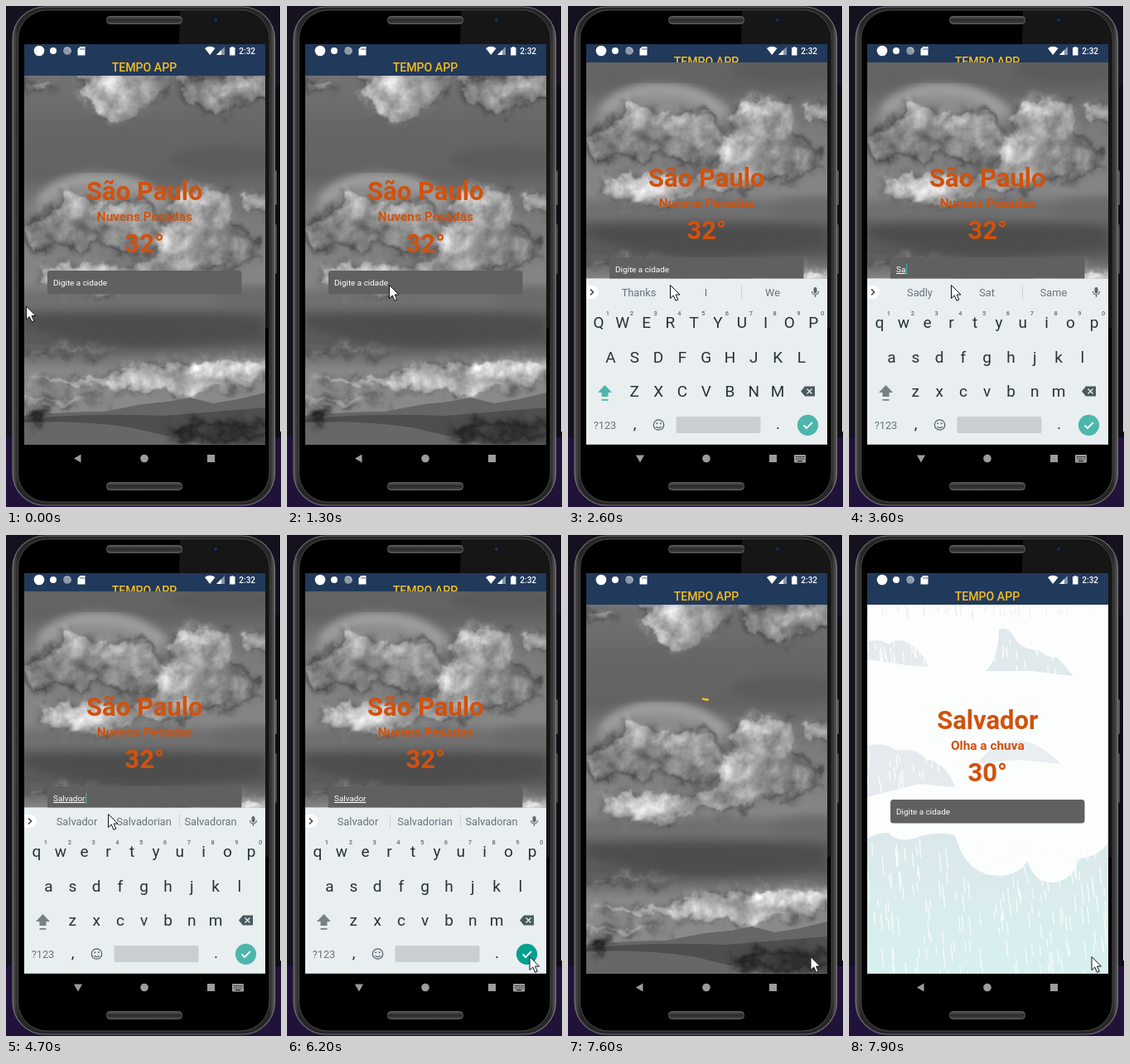
An HTML page that plays this animation: 332x604 px, repeating every 8000 ms.

```html
<!DOCTYPE html>
<html lang="pt">
<head>
<meta charset="utf-8">
<title>Tempo App</title>
<style>
html, body { margin: 0; width: 100%; height: 100%; overflow: hidden; background: #15111f; }
svg { display: block; width: 100vw; height: 100vh; }
text { font-family: Roboto, sans-serif; white-space: pre; }
.mid { text-anchor: middle; }
.key { font-size: 19px; fill: #263238; }
.num { font-size: 7.5px; font-weight: 500; fill: #5b6a72; }
.tip { font-size: 12.75px; fill: #66737a; }
.big { font-size: 31px; font-weight: 700; }
.sub { font-size: 15.4px; font-weight: 700; }
</style>
</head>
<body>
<svg id="stage" viewBox="0 0 332 604" xmlns="http://www.w3.org/2000/svg"></svg>
<script>
const LOOP = 8000, STEP = 100;
const stage = document.getElementById('stage');

// Small markup helpers
const rect = (x, y, w, h, fill, more = '') =>
  `<rect x="${x}" y="${y}" width="${w}" height="${h}" fill="${fill}" ${more}/>`;
const dot = (x, y, r, fill, more = '') => `<circle cx="${x}" cy="${y}" r="${r}" fill="${fill}" ${more}/>`;
const path = (d, fill, more = '') => `<path d="${d}" fill="${fill}" ${more}/>`;
const line = (d, stroke, w, more = '') => path(d, 'none', `stroke="${stroke}" stroke-width="${w}" ${more}`);
const text = (x, y, s, cls, more = '') => `<text x="${x}" y="${y}" class="${cls}" ${more}>${s}</text>`;
const oval = (x, y, rx, ry, fill) => `<ellipse cx="${x}" cy="${y}" rx="${rx}" ry="${ry}" fill="${fill}"/>`;

function random(seed) {
  return () => (seed = (seed * 16807) % 2147483647) / 2147483647;
}

const defs = `<defs>
  <linearGradient id="rim"><stop offset="0" stop-color="#555"/><stop offset=".02" stop-color="#262626"/>
    <stop offset=".98" stop-color="#262626"/><stop offset="1" stop-color="#5c5c5c"/></linearGradient>
  <linearGradient id="grille" x2="0" y2="1"><stop offset="0" stop-color="#555"/><stop offset=".5" stop-color="#292929"/>
    <stop offset="1" stop-color="#4a4a4a"/></linearGradient>
  <linearGradient id="sky" x2="0" y2="1"><stop offset="0" stop-color="#757575"/><stop offset=".14" stop-color="#666"/>
    <stop offset=".27" stop-color="#636363"/><stop offset=".36" stop-color="#7a7a7a"/><stop offset=".56" stop-color="#868686"/>
    <stop offset=".64" stop-color="#626262"/><stop offset=".72" stop-color="#5a5a5a"/><stop offset=".8" stop-color="#888"/>
    <stop offset=".87" stop-color="#8a8a8a"/></linearGradient>
  <linearGradient id="rainSky" x2="0" y2="1"><stop offset="0" stop-color="#dbe8eb"/><stop offset="1" stop-color="#d8f0f0"/></linearGradient>
  <filter id="puff" x="-20%" y="-20%" width="140%" height="140%" color-interpolation-filters="sRGB">
    <feTurbulence type="fractalNoise" baseFrequency=".05" numOctaves="4" seed="4" result="noise"/>
    <feColorMatrix in="noise" values="1 0 0 0 0 1 0 0 0 0 1 0 0 0 0 0 0 0 0 1" result="grain"/>
    <feGaussianBlur in="SourceGraphic" stdDeviation="4"/>
    <feDisplacementMap in2="noise" scale="24" xChannelSelector="R" yChannelSelector="G"/>
    <feComposite in2="grain" operator="arithmetic" k1=".8" k2=".6"/></filter>
  <filter id="soft" x="-20%" y="-20%" width="140%" height="140%"><feGaussianBlur stdDeviation="6"/></filter>
  <clipPath id="screen"><rect x="22" y="46" width="291" height="482.5"/></clipPath>
  <clipPath id="view"><rect id="viewBox" x="22" y="84" width="291" height="445"/></clipPath>
</defs>`;

const phone = () =>
  rect(0, 0, 332, 604, '#15111f') + rect(0, 520, 332, 84, '#21123a') +
  rect(324, 96, 8, 424, '#0e0c15') + rect(331, 0, 1, 513, '#f4f4f4') +
  rect(323, 198, 4, 42, '#555', 'rx="1.5"') + rect(323, 263, 4, 60, '#444', 'rx="1.5"') +
  rect(8, 1, 316.5, 601, 'url(#rim)', 'rx="39" stroke="#727272" stroke-width="1.2"') +
  rect(14.5, 5, 303.5, 593, '#000', 'rx="35" stroke="#4a4a4a" stroke-width="1"') +
  path('M210 6H283Q316 9 317.500 43V388H313V46H209Z', '#161616') +
  [12.5, 574.5].map(y => rect(121.5, y, 91, 9, 'url(#grille)', 'rx="4" stroke="#6a6a6a" stroke-width=".8"')).join('') +
  dot(253, 17, 4.5, '#11141f') + dot(253, 17, 2.2, '#1d2c4c');

const status = () =>
  dot(40, 54, 6.3, '#fff') + dot(57, 54, 4, '#fff') +
  dot(74, 54, 4.8, '#8f9aa8') + line('M70.5 51A4.8 4.8 0 0 1 78 56', '#b9c1cb', 1) +
  path('M89.500 49H95.500V59.500H86.500V52Z', '#fff') + line('M90 51V53M92 51V53M94 51V53', '#21395b', .8) +
  path('M240 51Q246 46.500 252.500 51L246.200 59Z', '#fff') +
  path('M264 49V59H254Z', '#8797aa') + path('M260 53V59H254Z', '#fff') +
  path('M270 50H272V49H274.500V50H276.500V59.500H270Z', '#fff') +
  text(281.3, 58, '2:32', '', 'font-size="10" font-weight="500" fill="#fff"');

// Clouds over fields, in soft grey tones
const photo = () => rect(22, 84, 291, 445, 'url(#sky)') +
  `<g filter="url(#soft)">${
    oval(265, 185, 70, 16, '#5c5c5c') + oval(150, 356, 190, 12, '#6f6f6f') +
    path('M22 372Q160 362 313 374V400Q210 412 160 412Q90 408 22 388Z', '#4d4d4d') +
    oval(300, 352, 55, 14, '#6b6b6b')
  }</g><g filter="url(#puff)">${
    path('M78 70H205Q200 112 165 126Q140 152 122 140Q92 118 78 70Z', '#959595') + oval(125, 102, 30, 22, '#c2c2c2') +
    path('M208 80H330V112Q285 112 258 138Q228 124 208 112Z', '#828282') + oval(278, 102, 38, 9, '#a5a5a5') +
    oval(40, 96, 26, 9, '#858585')
  }</g>` +
  path('M32 250Q40 214 95 202Q168 198 199 244L170 262H60Z', '#8d8d8d', 'filter="url(#soft)"') +
  line('M42 236Q62 210 105 208Q158 206 190 238', '#a6a6a6', 10, 'filter="url(#soft)"') +
  `<g filter="url(#puff)">${
    oval(85, 262, 38, 34, '#858585') + oval(148, 268, 42, 34, '#838383') +
    oval(78, 236, 19, 14, '#b8b8b8') + oval(138, 246, 36, 14, '#aaa') + oval(165, 262, 20, 18, '#9d9d9d') +
    oval(235, 247, 42, 32, '#9a9a9a') + oval(228, 230, 26, 13, '#c6c6c6') + oval(262, 248, 15, 14, '#ababab') +
    oval(212, 296, 30, 38, '#9f9f9f') + oval(208, 280, 24, 14, '#c0c0c0') + oval(262, 292, 40, 26, '#858585') +
    oval(98, 328, 62, 22, '#a2a2a2') + oval(92, 325, 42, 13, '#c8c8c8') + oval(182, 318, 34, 18, '#909090') +
    oval(304, 236, 20, 16, '#9a9a9a') + oval(45, 275, 22, 22, '#7d7d7d')
  }</g><g filter="url(#puff)">${
    oval(70, 416, 70, 6, '#868686') + oval(230, 444, 100, 20, '#a2a2a2') + oval(268, 435, 52, 11, '#d8d8d8') +
    oval(110, 452, 90, 8, '#b6b6b6') + oval(60, 476, 60, 7, '#a2a2a2') + oval(195, 462, 70, 7, '#bdbdbd')
  }</g>` +
  path('M22 494Q70 489 118 489L165 480L195 477L222 472L250 479L280 474L313 466V529H22Z', '#666') +
  path('M22 498Q100 490 190 494L313 484V529H22Z', '#4e4e4e') +
  path('M22 502Q90 499 150 508L240 529H22Z', '#676767') +
  `<g filter="url(#puff)">${oval(38, 495, 12, 7, '#333') + oval(265, 512, 70, 11, '#3c3c3c')}</g>`;

function rainDrops(count, x0, y0, w, h, seed, color, len) {
  const rnd = random(seed);
  let d = '';
  for (let i = 0; i < count; i++) {
    const x = x0 + rnd() * w, y = y0 + rnd() * h, l = len * (.5 + rnd());
    d += `M${x.toFixed(1)} ${y.toFixed(1)}l${(l * .1).toFixed(1)} ${l.toFixed(1)}`;
  }
  return line(d, color, 1.3);
}

const rainArt = () => rect(22, 84, 291, 445, '#fcfdfd') +
  rainDrops(40, 22, 80, 291, 12, 5, '#edf0f1', 9) +
  path('M22 129Q37 124 48 132Q61 121 75 133Q88 139 96 159L70 157L22 150Z', '#e5ebed') +
  path('M165 164Q180 151 181 114Q192 110 199 123Q207 138 229 139Q241 149 252 148L271 170L220 164Z', '#e0e9eb') +
  path('M22 254Q45 249 58 260Q78 255 93 270Q119 276 128 304L85 300L22 316Z', '#e4eaed') +
  path('M155 276Q174 248 207 248Q230 250 256 276L204 271Z', '#e9eef0') +
  path('M22 366Q34 358 48 359Q58 371 78 366Q105 356 128 362Q141 411 182 411Q204 410 216 393Q223 419 245 419Q270 418 277 390Q303 388 313 370V529H22Z', 'url(#rainSky)') +
  rainDrops(180, 22, 366, 291, 160, 17, '#f8fcfc', 16) +
  rainDrops(20, 22, 127, 70, 26, 31, '#fcfdfd', 12) + rainDrops(20, 170, 122, 85, 40, 8, '#fcfdfd', 12) +
  rainDrops(22, 22, 258, 100, 45, 51, '#fcfdfd', 12);

const ROWS = [['qwertyuiop', 37, 388], ['asdfghjkl', 51.5, 429.5], ['zxcvbnm', 80.3, 471]];
const GAP = 28.8;

const keyboard = () => rect(22, 329, 291, 200, '#e9eef1') +
  path('M22 337H29A8 8 0 0 1 29 353H22Z', '#fff') + line('M27 341.500L30.500 345L27 348.500', '#37474f', 1.6) +
  [85.5, 166.5, 247].map((x, i) => text(x, 350, '', 'tip mid', `id="tip${i}"`)).join('') +
  line('M124.500 337V353M209.500 337V353', '#cdd4d8', 1) +
  rect(296.5, 339, 4, 7.5, '#5b676d', 'rx="2"') + line('M294.500 344A4 4 0 0 0 302.500 344M298.500 348V351', '#5b676d', 1.2) +
  ROWS.map(([keys, x, y]) => [...keys].map((k, i) => text(x + i * GAP, y, k, 'key mid')).join('')).join('') +
  [...'1234567890'].map((n, i) => text(48 + i * GAP, 373, n, 'num mid')).join('') +
  `<g id="shift">${path('M44.500 457L53 466H48.500V471H40.500V466H36Z', 'inherit')}${rect(40.5, 474, 8, 1.8, 'inherit')}</g>` +
  path('M281 464.500L286 458.500H298V470.500H286Z', '#4a5a62') + line('M288.500 461.500L294.500 467.500M294.500 461.500L288.500 467.500', '#e9eef1', 1.4) +
  text(44.5, 509.5, '?123', 'tip mid') + text(80.5, 510, ',', 'key mid') + text(253.5, 510, '.', 'key mid') +
  dot(109.5, 505, 6.2, 'none', 'stroke="#53626a" stroke-width="1.3"') + dot(107.3, 503.3, 1, '#53626a') +
  dot(111.7, 503.3, 1, '#53626a') + line('M106.500 507Q109.500 510.500 112.500 507', '#53626a', 1.2) +
  rect(130.5, 495, 102, 20, '#c9ced1', 'rx="2"') +
  dot(289.5, 505.3, 12.6, '#4db6ac', 'id="done"') + line('M284.500 505.500L288 509L295 502', '#fff', 1.8);

const nav = () =>
  path('M90.500 540.500V550.500L82 545.500Z', '#9c9c9c', 'id="back"') +
  path('M82 541.500H92L87 550.500Z', '#9c9c9c', 'id="hide"') +
  dot(167, 545.5, 4.8, '#9c9c9c') + rect(243, 541, 9, 9, '#9c9c9c') +
  `<g id="imeIcon">${rect(273, 541, 14, 9.5, '#9c9c9c', 'rx="1"')}${
    line('M275 543.500H285.500M275 546H285.500', '#111', 1.2, 'stroke-dasharray="1.4 .9"')}${line('M277 548.500H283', '#111', 1)}</g>`;

stage.innerHTML = defs + phone() + nav() +
  `<g clip-path="url(#screen)">${
    rect(22, 46, 291, 483, '#fff') + rect(22, 46, 291, 38, '#21395b', 'id="header"') +
    text(167, 79, 'TEMPO APP', 'mid', 'id="title" font-size="14.100" font-weight="500" fill="#f5bd1f"')}
    <g clip-path="url(#view)"><g id="photo">${photo()}</g><g id="rain">${rainArt()}</g>
      <g id="info">
        <g fill="#d2510c">${text(167.3, 234, '', 'big mid', 'id="city"') + text(167.3, 259, '', 'sub mid', 'id="sky1"') +
          text(167.3, 296.5, '', 'big mid', 'id="temp"')}</g>
        ${rect(50, 319, 234.5, 28.5, '#606060', 'rx="3.500"') +
          text(57, 337, '', '', 'id="field" font-size="9.920" fill="#fff"') +
          rect(57.3, 327, 1.3, 13, '#3fae9f', 'id="caret"')}
      </g>
      ${dot(167.3, 188.7, 9.8, 'none', 'id="spin" stroke="#fcc11c" stroke-width="2.400" pathLength="360"')}
    </g>${status()}<g id="ime">${keyboard()}</g></g>` +
  path('M.5 .5V16.500L4.300 13L7 19.300L9.800 18.100L7.100 12H12Z', '#fff', 'id="mouse" stroke="#111" stroke-width="1"');

const $ = {};
stage.querySelectorAll('[id]').forEach(e => $[e.id] = e);
const keys = [...stage.querySelectorAll('.key')];
const show = (e, on) => e.style.display = on ? '' : 'none';
const put = (e, s) => { if (e.textContent !== s) e.textContent = s; };
const move = (e, x, y) => e.setAttribute('transform', `translate(${x} ${y})`);
const clamp = p => Math.min(1, Math.max(0, p));
const ease = p => p * p * (3 - 2 * p);

// Time, typed text and the three suggestions
const TYPING = [
  [2100, '', 'Thanks', 'I', 'We'],
  [3300, 'S', 'Should', 'So', 'She'],
  [3600, 'Sa', 'Sadly', 'Sat', 'Same'],
  [3800, 'Sal', 'Sale', 'Sal', 'Salt'],
  [4100, 'Salv', 'Salv', 'Salvo', 'Salvage'],
  [4300, 'Salva', 'Salva', 'Salvador', 'Salvadoran'],
  [4600, 'Salvado', 'Salvador', 'Salvado', 'Salvadoran'],
  [4700, 'Salvador', 'Salvador', 'Salvadorian', 'Salvadoran']
];
const MOUSE = [[0, 24, 361.5], [99, 24, 361.5], [100, 134, 377], [300, 134, 377], [800, 125, 342], [900, 125, 342],
  [1000, 124, 341], [1100, 124, 341], [1300, 123, 336], [5200, 123, 336], [5900, 292.5, 508]];

function mouseAt(t) {
  let i = 0;
  while (i < MOUSE.length - 1 && MOUSE[i + 1][0] <= t) i++;
  const a = MOUSE[i], b = MOUSE[i + 1];
  if (!b) return a.slice(1);
  const p = (t - a[0]) / (b[0] - a[0]), q = a[0] === 5200 ? ease(p) : p;
  return [a[1] + (b[1] - a[1]) * q, a[2] + (b[2] - a[2]) * q];
}

// [opacity, vertical offset] of the keyboard
function imeAt(t) {
  if (t < 2000 || t >= 6700) return [0, 0];
  if (t < 2200) return t < 2100 ? [.35, 20] : [.8, 5];
  if (t < 6400) return [1, 0];
  return t < 6500 ? [.5, 16] : [.05, 38];
}

function drawSpinner(t) {
  const at = t < 6700 ? Math.min(t, 6500) : Math.min(t, 7600);
  const run = 130 + (at - 6500) * 1.21, p = (run / 1333) % 1;
  const head = 270 * ease(clamp(p * 2)), tail = 270 * ease(clamp(p * 2 - 1));
  const turn = -90 + tail + p * 90 + run * 720 / 6665;
  $.spin.setAttribute('stroke-dasharray', `${head - tail + 20} 360`);
  $.spin.setAttribute('transform', `rotate(${turn} 167.3 188.7)`);
}

function render(ms) {
  const t = Math.floor((ms % LOOP) / STEP) * STEP;
  const small = t >= 1800 && t < 6400, focus = t >= 1700 && t < 6400;
  const loading = t >= 6400 && t < 7800, rainy = t >= 7800;

  $.viewBox.setAttribute('y', small ? 68 : 84);
  $.viewBox.setAttribute('height', small ? 260.5 : 445);
  $.header.setAttribute('height', small ? 22 : 38);
  move($.title, 0, small ? -7 : 0);
  move($.photo, 0, small ? -108 : 0);
  move($.info, 0, small ? -16 : 0);
  show($.photo, !rainy);
  show($.rain, rainy);
  $.rain.style.opacity = t < 7900 ? .4 : 1;

  show($.info, !loading);
  put($.city, rainy ? 'Salvador' : 'São Paulo');
  put($.sky1, rainy ? 'Olha a chuva' : 'Nuvens Pesadas');
  put($.temp, rainy ? '30°' : '32°');

  const [since, word, ...tips] = TYPING.filter(s => s[0] <= t).pop() || TYPING[0];
  const typed = focus ? word : '';
  put($.field, typed || 'Digite a cidade');
  $.field.setAttribute('text-decoration', typed ? 'underline' : 'none');
  show($.caret, focus && t >= 2100 && Math.floor((t - since) / 500) % 2 === 0);
  $.caret.setAttribute('x', typed ? 57.6 + $.field.getComputedTextLength() : 57.3);

  const [alpha, drop] = imeAt(t);
  show($.ime, alpha > 0);
  $.ime.style.opacity = alpha;
  move($.ime, 0, drop);
  tips.forEach((s, i) => put($['tip' + i], s));
  keys.forEach(k => put(k, word ? k.textContent.toLowerCase() : k.textContent.toUpperCase()));
  $.shift.setAttribute('fill', word ? '#74838a' : '#4db6ac');
  $.done.setAttribute('fill', t >= 6100 ? '#00a08f' : '#4db6ac');

  show($.back, !focus);
  show($.hide, focus);
  show($.imeIcon, focus);
  show($.spin, loading);
  if (loading) drawSpinner(t);
  move($.mouse, ...mouseAt(t));
}

const start = performance.now();
function tick() {
  render(performance.now() - start);
  requestAnimationFrame(tick);
}
tick();
</script>
</body>
</html>
```
